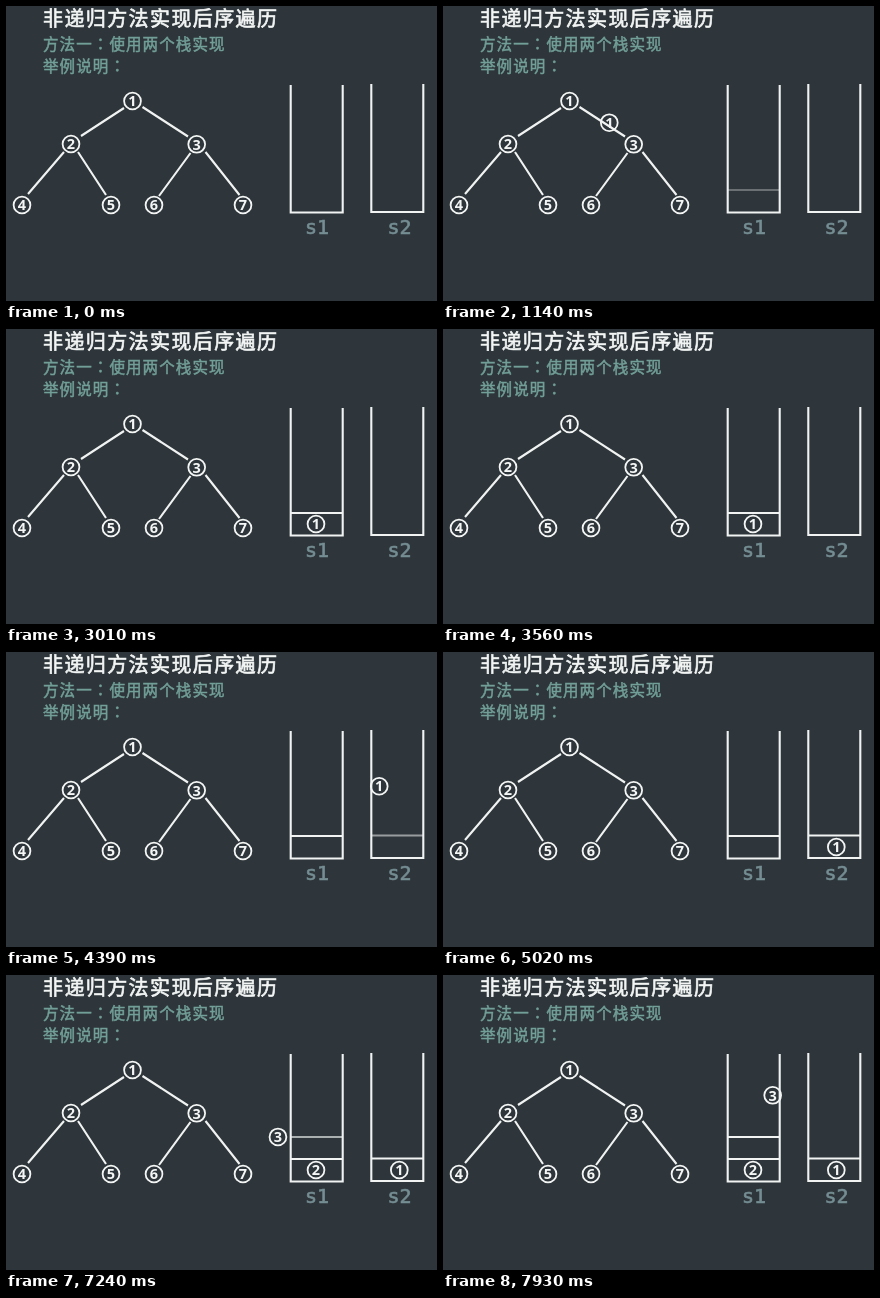
An HTML page for the animation above (8 s loop, 431 by 295 pixels).

```html
<!DOCTYPE html>
<html lang="zh-CN">
<head>
<meta charset="utf-8">
<style>
  html, body { margin: 0; width: 100%; height: 100%; overflow: hidden; background: #2e363b; }
  svg { display: block; width: 100vw; height: 100vh; }
  .cjk { font-family: "Noto Sans CJK SC", "Noto Sans CJK", sans-serif; }
  .cjk [lang] { font-family: "Noto Sans CJK TC", "Noto Sans CJK", sans-serif; }
  .title { font-size: 20px; letter-spacing: 1.4px; fill: #f2f5f4; stroke: #f2f5f4; stroke-width: .7; }
  .sub { font-size: 15.5px; letter-spacing: 1.1px; fill: #729f98; stroke: #729f98; stroke-width: .5; }
  .label { font: 20px "DejaVu Sans Mono", monospace; fill: #758e93; stroke: #758e93; stroke-width: .6; text-anchor: middle; }
  .line { fill: none; stroke: #f0f3f2; stroke-width: 2.1; }
  .node circle { fill: none; stroke: #f4f6f5; stroke-width: 1.8; }
  .node text { font: 600 14.5px "Noto Sans", sans-serif; fill: #f4f6f5; text-anchor: middle; }
</style>
</head>
<body>
<svg id="stage" viewBox="0 0 431 295">
  <rect width="431" height="295" fill="#2e363b"/>
  <text class="cjk title" x="37" y="20">非递归方法实现后序遍历</text>
  <text class="cjk sub" x="37" y="44">方法一<tspan lang="zh-TW">：</tspan>使用两个栈实现</text>
  <text class="cjk sub" x="37" y="65.5">举例说明<tspan lang="zh-TW">：</tspan></text>
  <path class="line" d="M118 102L75 130M136.5 101L182 130.5M58 146L22 188M72 146L100 189M184.5 147L153 190M199.5 146L233.5 189"/>
  <path class="line" d="M284.7 79V206.5H336.7V79M365.3 78V206H417.3V78"/>
  <text class="label" x="311" y="228">s1</text>
  <text class="label" x="393.5" y="228">s2</text>
</svg>
<script>
const LOOP = 8000;
const stage = document.getElementById('stage');

function add(tag, attrs, parent = stage) {
  const el = document.createElementNS('http://www.w3.org/2000/svg', tag);
  for (const key in attrs) el.setAttribute(key, attrs[key]);
  parent.append(el);
  return el;
}

function addNode(n, x, y) {
  const g = add('g', { class: 'node' });
  add('circle', { r: 8.4 }, g);
  add('text', { y: 5.2 }, g).textContent = n;
  place(g, [x, y]);
  return g;
}

const place = (el, [x, y]) => el.setAttribute('transform', `translate(${x.toFixed(2)} ${y.toFixed(2)})`);
const progress = (t, start, span) => Math.min(1, Math.max(0, (t - start) / span));
const ease = p => (1 - Math.cos(Math.PI * p)) / 2;

const slide = (a, b, p) => [a[0] + (b[0] - a[0]) * p, a[1] + (b[1] - a[1]) * p];

// Half ellipse from a to b, rising by h
function arc(a, b, h, p) {
  const [x, y] = slide(a, b, ease(p));
  return [x, y - h * Math.sin(Math.PI * p)];
}

const tree = [[126.5, 95], [65, 138], [190.7, 138.3], [16, 199], [105, 199], [148, 199], [237, 199]];
tree.forEach(([x, y], i) => addNode(i + 1, x, y));

const low1 = [310, 195], high1 = [310, 173], low2 = [393.3, 195], high2 = [393.3, 173];

const moves = [
  { n: 1, start: 1030, span: 360, path: p => slide(tree[0], low1, p) },
  { n: 1, start: 4054, span: 550, path: p => arc(low1, low2, 71, p) },
  { n: 2, start: 5602, span: 550, path: p => slide(tree[1], low1, p) },
  { n: 3, start: 6932, span: 500, path: p => slide(tree[2], high1, p) },
  { n: 3, start: 7700, span: 600, path: p => arc(high1, high2, 62, p) }
];
const movers = {};
for (const { n } of moves) movers[n] ??= addNode(n, ...tree[n - 1]);

const shelves = [
  { d: 'M285 184H337', start: 1030, span: 360 },
  { d: 'M365.5 183.5H417.5', start: 4200, span: 350 },
  { d: 'M285 162H337', start: 6932, span: 480 }
];
for (const s of shelves) s.el = add('path', { class: 'line', d: s.d });

const player = add('g', {});
add('rect', { x: 373.5, y: 177.5, width: 32, height: 21, fill: '#080a0b', stroke: '#566461' }, player);
add('path', { d: 'M385 183L395 188L385 193Z', fill: '#fff' }, player);

function render(t) {
  for (const n in movers) movers[n].style.display = 'none';
  for (const m of moves) {
    if (t < m.start) continue;
    movers[m.n].style.display = '';
    place(movers[m.n], m.path(ease(progress(t, m.start, m.span))));
  }
  for (const s of shelves) s.el.style.opacity = progress(t, s.start, s.span);
  player.style.opacity = progress(t, 1640, 240) - progress(t, 2310, 250);
}

const begin = performance.now();
function tick() {
  render((performance.now() - begin) % LOOP);
  requestAnimationFrame(tick);
}
tick();
</script>
</body>
</html>
```
